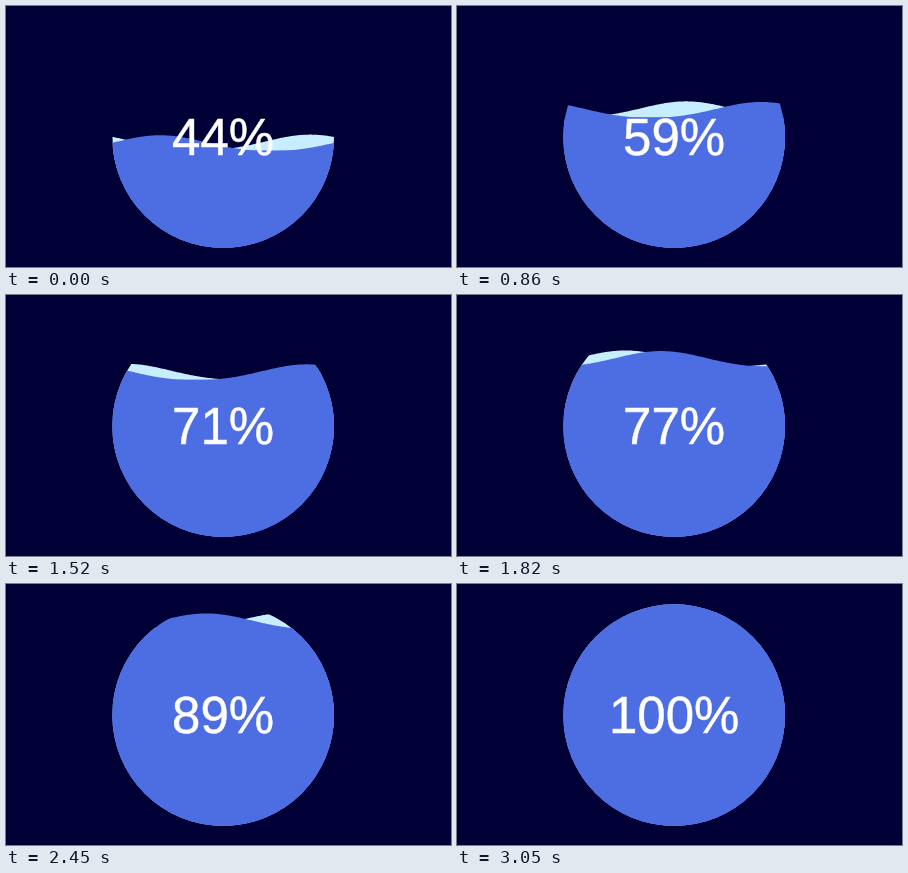
An HTML page with a canvas for the animation above (3340 ms loop, 445 px wide and 261 px high).

```html
<!DOCTYPE html>
<html lang="en">
<head>
<meta charset="utf-8">
<title>Filling circle</title>
<style>
  html, body { margin: 0; width: 100%; height: 100%; overflow: hidden; background: #000036; }
  canvas { display: block; }
</style>
</head>
<body>
<canvas id="stage" width="445" height="261"></canvas>
<script>
const stage = document.getElementById('stage');
const ctx = stage.getContext('2d');
const LOOP = 3340, TICK = 46.72, FIRST_TICK = 10;
const LEFT = 106.3, TOP = 20.3, SIZE = 221.7, MIDDLE = LEFT + SIZE / 2;
const WAVE_HEIGHT = SIZE / 14;
const BLUE = '#4D6DE3', PALE = '#C7EEFF';

// The picture advances in even ticks
function tick(t) {
  return Math.max(0, FIRST_TICK + Math.floor((t - FIRST_TICK) / TICK) * TICK);
}

// Depth below the crest, 0 to 1: a cosine with narrowed crests
function depth(angle) {
  return (1 - Math.cos(angle)) / 2 + 0.09 * Math.sin(angle) ** 2;
}

// Fills everything below a wave whose crest has moved right by the given turns
function fillWave(turns, bottom, color) {
  ctx.beginPath();
  ctx.moveTo(LEFT, stage.height);
  for (let x = 0; x <= SIZE + 1; x++) {
    const angle = 2 * Math.PI * (x / SIZE - turns);
    ctx.lineTo(LEFT + x, bottom - WAVE_HEIGHT * (1 - depth(angle)));
  }
  ctx.lineTo(LEFT + SIZE + 1, stage.height);
  ctx.fillStyle = color;
  ctx.fill();
}

function draw(t) {
  const percent = Math.min(100, 44 + Math.floor((t + 17) / 54.5));
  const level = TOP + SIZE * (1 - percent / 100);
  const clock = 1249 + 1.088 * t;

  ctx.clearRect(0, 0, stage.width, stage.height);
  ctx.save();
  ctx.beginPath();
  ctx.arc(MIDDLE, TOP + SIZE / 2, SIZE / 2, 0, 2 * Math.PI);
  ctx.clip();
  fillWave(clock / 1400, level, PALE);
  fillWave(-clock / 700, level + 0.6, BLUE);
  ctx.fillRect(LEFT, level, SIZE, SIZE);
  ctx.restore();

  ctx.fillStyle = ctx.strokeStyle = '#fff';
  ctx.lineWidth = 0.5;
  ctx.font = '51px "Liberation Sans", Arial, sans-serif';
  ctx.textAlign = 'center';
  ctx.fillText(percent + '%', MIDDLE, 149);
  ctx.strokeText(percent + '%', MIDDLE, 149);
}

const begin = performance.now();
function frame() {
  draw(tick((performance.now() - begin) % LOOP));
  requestAnimationFrame(frame);
}
frame();
</script>
</body>
</html>
```
